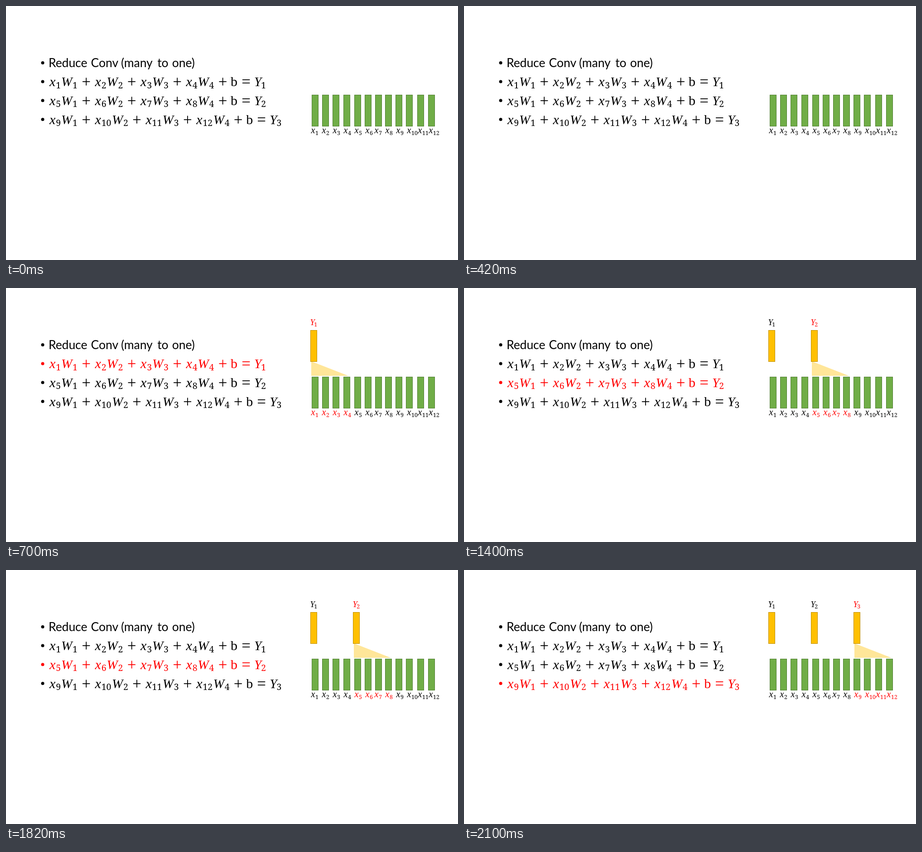
Animation of 998x561 px, one loop 2800 ms. Source, as an HTML page with a canvas:

```html
<!DOCTYPE html>
<html lang="en">
<head>
<meta charset="utf-8">
<title>Reduce Conv</title>
<style>
html, body { margin: 0; width: 100%; height: 100%; overflow: hidden; background: #fff; }
canvas { display: block; }
</style>
</head>
<body>
<canvas id="stage" width="998" height="561"></canvas>
<script>
const ctx = document.getElementById("stage").getContext("2d");
const STEP_MS = 700;
const STEPS = 4;
const BLACK = "#000", RED = "#f00";
const ITALIC = "italic SIZEpx 'Liberation Serif', serif";
const UPRIGHT = "SIZEpx 'Liberation Serif', serif";
const DIGITS = "SIZEpx 'Noto Serif', serif";
const SANS = "SIZEpx Lato, sans-serif";
const BAR_X = [675, 698, 721, 745, 769, 792, 815, 837, 860, 883, 908, 932];

function write(text, x, y, font, size, align = "left") {
  ctx.font = font.replace("SIZE", size);
  ctx.textAlign = align;
  ctx.fillText(text, x, y);
}

function bullet(y) {
  ctx.beginPath();
  ctx.arc(81, y, 3.5, 0, Math.PI * 2);
  ctx.fill();
}

function bar(x, y, fill, stroke) {
  ctx.fillStyle = fill;
  ctx.strokeStyle = stroke;
  ctx.lineWidth = 1;
  ctx.fillRect(x + 0.5, y + 0.5, 14, 69);
  ctx.strokeRect(x + 0.5, y + 0.5, 14, 69);
}

function title() {
  ctx.fillStyle = BLACK;
  bullet(125.6);
  const words = { "Reduce": 94, "Conv": 187.6, "(many": 254, "to": 334.2, "one)": 366.8 };
  for (const word in words) write(word, words[word], 135, SANS, 26.4);
}

function equation(row, color) {
  const y = 177.1 + row * 41.8;
  const sub = (n, x) => write(n, x, y + 4.5, DIGITS, 19.3);
  const operator = (sign, x) => write(sign, x, y + 2, UPRIGHT, 35, "center");
  let x = 95;

  ctx.fillStyle = color;
  bullet(y - 10.1);
  for (let i = 1; i <= 4; i++) {
    const index = row * 4 + i;
    write("x", x + 1, y, ITALIC, 30);
    sub(index, x + 15.2);
    if (index > 9) x += 11.4;
    write("W", x + 27, y, ITALIC, 29);
    sub(i, x + 52);
    operator("+", x + 82);
    x += 100.5;
  }
  write("b", x - 1, y, UPRIGHT, 30);
  operator("=", x + 33);
  write("Y", x + 51, y, ITALIC, 29);
  sub(row + 1, x + 66.2);
}

function inputs(active) {
  BAR_X.forEach((barX, i) => {
    bar(barX, 196, "#70ad47", "#507e32");
    const x = 673 + i * 24 - (i > 5 ? 4 : 0);
    ctx.fillStyle = Math.floor(i / 4) === active ? RED : BLACK;
    write("x", x + 0.5, 281, ITALIC, 20);
    write(i + 1, x + 10, 284.8, DIGITS, 12.4);
  });
}

function output(k, active) {
  const x = 672 + k * 94;
  if (k === active) {
    ctx.fillStyle = "#ffe699";
    ctx.beginPath();
    ctx.moveTo(x + 2, 162);
    ctx.lineTo(x + 2, 194);
    ctx.lineTo(x + 84, 194);
    ctx.fill();
  }
  bar(x, 93, "#ffc000", "#bc8c00");
  ctx.fillStyle = k === active ? RED : BLACK;
  write("Y", x - 0.4, 82, ITALIC, 18.5);
  write(k + 1, x + 8.3, 85.2, DIGITS, 12.4);
}

function draw(time) {
  const active = Math.floor(time / STEP_MS) % STEPS - 1;
  ctx.fillStyle = "#fff";
  ctx.fillRect(0, 0, 998, 561);
  title();
  for (let row = 0; row < 3; row++) equation(row, row === active ? RED : BLACK);
  for (let k = 0; k <= active; k++) output(k, active);
  inputs(active);
}

const start = performance.now();
function tick() {
  draw(performance.now() - start);
  requestAnimationFrame(tick);
}
tick();
</script>
</body>
</html>
```
